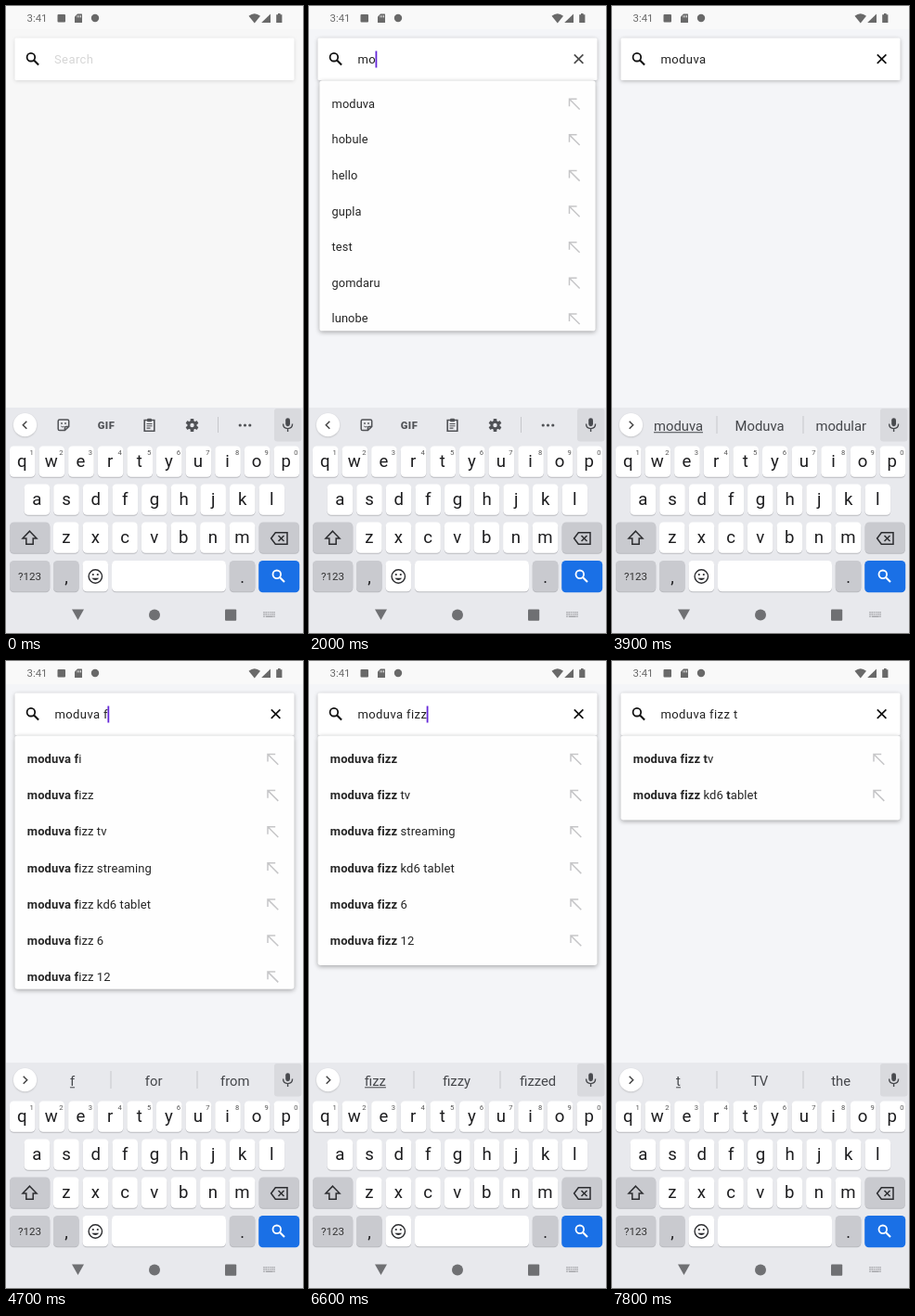
An HTML page with a canvas for the animation above (8000 ms loop, 320x676 px).

```html
<!DOCTYPE html>
<html lang="en">
<head>
<meta charset="utf-8">
<title>Search suggestions</title>
<style>
html, body { margin: 0; width: 100%; height: 100%; overflow: hidden; background: #f4f5f8; }
canvas { display: block; width: 320px; height: 676px; }
</style>
</head>
<body>
<canvas id="stage"></canvas>
<script>
const W = 320, H = 676, LOOP = 8000;
const canvas = document.getElementById('stage');
const ratio = window.devicePixelRatio || 1;
canvas.width = W * ratio;
canvas.height = H * ratio;
const c = canvas.getContext('2d');
const FONT = 'Roboto, sans-serif';

// [time, typed text, start of the cursor's blink]
const TYPING = [
  [0, '', 500], [1300, 'm', 1300], [1800, 'mo', 1800], [2600, 'mod', 2600],
  [3100, 'modu', 3100], [3250, 'moduv', 3250], [3400, 'moduva', 3400],
  [4200, 'moduva ', 4200], [4600, 'moduva f', 4600], [5100, 'moduva fi', 5000],
  [6200, 'moduva fiz', 6200], [6500, 'moduva fizz', 6500],
  [6800, 'moduva fizz ', 6800], [7300, 'moduva fizz t', 7300]
];

// [time, three suggested words]; none shows the toolbar
const STRIP = [
  [0, ''], [2300, 'mo,mom,more'], [2600, 'mod,moduva,Moduva'],
  [3100, 'modu,moduva,Moduva'], [3400, 'moduva,Moduva,modular'],
  [4300, 'with,and,is'], [4700, 'f,for,from'], [5200, 'fi,first,fine'],
  [5900, 'fi,first,#medal'], [6300, 'fiz,fizz,fixing'], [6600, 'fizz,fizzy,fizzed'],
  [7000, ''], [7500, 't,TV,the']
];

const brand = words => words.split(',').map(w => w ? 'moduva ' + w : 'moduva');
const popular = ['moduva', 'hobule', 'hello', 'gupla', 'test', 'gomdaru', 'lunobe'];
const starters = [...brand(',fizz,horn'), 'modular', ...brand('fizz tv,horn cup,fi')];
const related = brand('fizz,horn,fizz tv,horn cup,fi,fizz streaming,fizz kd6 tablet');
const fizz = brand('fizz,fizz tv,fizz streaming,fizz kd6 tablet,fizz 6,fizz 12');
const LISTS = [
  [0, []], [1850, popular], [2200, starters],
  [3250, [...starters.filter(s => s !== 'modular'), 'moduva fizz 6']],
  [4200, related], [4600, ['moduva fi', ...fizz]], [6200, fizz],
  [7300, brand('fizz tv,fizz kd6 tablet')]
];
const POPUP = [[1850, 3500], [4150, LOOP + 999]];

const at = (rows, t) => rows.filter(r => r[0] <= t).pop();
const clamp = v => Math.max(0, Math.min(1, v));

function text(s, x, y, size, color, align = 'left', weight = 400, gap = 0) {
  c.font = `${weight} ${size}px ${FONT}`;
  c.letterSpacing = gap + 'px';
  c.textAlign = align;
  c.fillStyle = color;
  c.fillText(s, x, y);
  return c.measureText(s).width;
}
function box(x, y, w, h, r, fill) {
  c.beginPath();
  c.roundRect(x, y, w, h, r);
  c.fillStyle = fill;
  c.fill();
}
function disc(x, y, r, fill) {
  c.beginPath();
  c.arc(x, y, r, 0, 7);
  c.fillStyle = fill;
  c.fill();
}
function path(d, color, width) {
  const p = new Path2D(d);
  if (width) {
    c.strokeStyle = color;
    c.lineWidth = width;
    c.stroke(p);
  } else {
    c.fillStyle = color;
    c.fill(p);
  }
}
function shadow(blur, dy, color) {
  c.shadowBlur = blur * ratio;
  c.shadowOffsetY = dy * ratio;
  c.shadowColor = color;
}
const noShadow = () => shadow(0, 0, 'transparent');

function magnifier(x, y, color) {
  c.beginPath();
  c.arc(x - 1.8, y - 1.8, 4.3, 0, 7);
  c.strokeStyle = color;
  c.lineWidth = 1.8;
  c.stroke();
  path(`M${x + 1.4} ${y + 1.4}L${x + 6.4} ${y + 6.4}`, color, 2.1);
}

function statusBar() {
  const g = '#696969';
  box(0, 0, W, 25, 0, '#f9f9f9');
  text('3:41', 22.5, 17, 11.4, g);
  box(55.5, 9, 8.5, 8.5, 1, g);
  path('M77 8.5H81.5Q82 8.5 82 9V17.5Q82 18 81.5 18H74.5Q74 18 74 17.5V11.5Z', g);
  path('M77 10.2V12.4M78.8 10.2V12.4M80.5 10.2V12.4', '#f9f9f9', .8);
  disc(96, 13, 4.2, g);
  path('M261.5 10.8Q267.8 5.8 274 10.8L267.8 18.4Z', g);
  path('M285 8.5V18H275.2Z', g);
  path('M293 8H295.6V9.2H297.4V18H291.2V9.2H293Z', g);
}

function searchCard(t) {
  const [, typed, base] = at(TYPING, t);
  shadow(4, 1, t < 100 ? 'rgba(0,0,0,.13)' : 'rgba(0,0,0,.27)');
  box(9.5, 34.5, 301, 45.5, 1.5, '#fff');
  noShadow();
  magnifier(28.7, 57, '#111');
  let end = 52.5;
  if (typed) end += text(typed, 52.5, 62.3, 13, '#222', 'left', 400, .4);
  else text('Search', 52, 62.3, 13, t < 100 ? '#d6d6d6' : '#c2c2c2', 'left', 400, .4);
  if (t >= base && Math.floor((t - base) / 500) % 2 === 0) box(end - .6, 48.5, 1.8, 18, 0, '#6426d9');
  c.globalAlpha = clamp((t - 1700) / 400);
  path('M285.8 52.3L295.4 61.9M295.4 52.3L285.8 61.9', '#111', 1.7);
  c.globalAlpha = 1;
}

// Splits an item into runs, with the start of each matching word in bold
function boldRuns(item, query) {
  const runs = [];
  const wanted = query.trim().split(' ');
  item.split(' ').forEach((word, i) => {
    const lead = i ? ' ' : '';
    if (wanted[0] && word.startsWith(wanted[0])) {
      const n = wanted.shift().length;
      runs.push([lead + word.slice(0, n), 700], [word.slice(n), 400]);
    } else runs.push([lead + word, 400]);
  });
  return runs;
}

function dropdown(t) {
  const span = POPUP.find(([from, to]) => t >= from && t < to + 150);
  if (!span) return;
  const items = at(LISTS, t)[1];
  const p = clamp((t - span[0]) / 250);
  const scale = .92 + .08 * (1 - (1 - p) ** 2);
  const query = items === popular ? '' : at(TYPING, t)[1];
  const h = Math.min(273.5, 13 + 39.1 * items.length);
  c.save();
  c.globalAlpha = Math.min(clamp(p * 2), 1 - clamp((t - span[1]) / 150));
  c.translate(160, 80.5);
  c.scale(scale, scale);
  c.translate(-160, -80.5);
  shadow(5, 1.5, 'rgba(0,0,0,.33)');
  box(9.5, 80.3, 301, h, 3, '#fefefe');
  noShadow();
  c.clip();
  items.forEach((item, i) => {
    const y = 110.2 + 39.1 * i;
    let x = 22.8;
    for (const [run, weight] of boldRuns(item, query)) {
      if (run) x += text(run, x, y, 13, '#252525', 'left', weight, .1);
    }
    path(`M293.3 ${y + 1.6}L282 ${y - 9.7}M282 ${y - 1.6}V${y - 9.7}H290.2`, '#c6c6c8', 1.5);
  });
  c.restore();
}

function toolbar() {
  const g = '#505256';
  path('M67.7 453.5V447.6Q67.7 446 66.1 446H57.8Q56.2 446 56.2 447.6V456Q56.2 457.6 57.8 457.6H63.4ZM63.4 457.6V454.8Q63.4 453.5 64.7 453.5H67.7', g, 1.5);
  disc(60, 450, .9, g);
  disc(64, 450, .9, g);
  path('M59.2 453Q61 454.8 62.6 453.4', g, 1);
  text('GIF', 108, 455.6, 11.2, g, 'center', 900, .4);
  path('M149.2 446.5H159.8V458.2H149.2Z', g, 1.6);
  box(152, 444.8, 5, 3.4, 1, g);
  path('M151.5 450.5H157.5M151.5 452.8H157.5M151.5 455.1H155.5', g, 1.1);
  for (let i = 0; i < 6; i++) {
    c.save();
    c.translate(200.5, 452);
    c.rotate(i * Math.PI / 3);
    box(-1.8, -7, 3.6, 4, .6, g);
    c.restore();
  }
  disc(200.5, 452, 5.1, g);
  disc(200.5, 452, 2.2, '#e8e9ed');
  box(228, 443, 1, 17, 0, '#c6c7cb');
  [252.2, 257.5, 262.8].forEach(x => disc(x, 452, 1.6, g));
}

function medal(x) {
  path(`M${x - 6.5} 444H${x + 6.5}L${x + 2} 452.5H${x - 2}Z`, '#2b8fd0');
  path(`M${x - 2} 444H${x + 2}L${x} 449Z`, '#e8e9ed');
  disc(x, 455.2, 5.6, '#e6a523');
  disc(x, 455.2, 4.4, '#fbcf4a');
  text('1', x, 458, 7.5, '#b9791a', 'center', 700);
}

function strip(t) {
  const words = at(STRIP, t)[1];
  box(289, 434, 29.5, 35.5, 3, '#d9dade');
  shadow(2, .6, 'rgba(0,0,0,.2)');
  disc(20.5, 451.7, 12.6, '#fff');
  noShadow();
  path(words ? 'M18.7 447.7L22.7 451.7L18.7 455.7' : 'M22.3 447.7L18.3 451.7L22.3 455.7', '#444', 1.5);
  box(301.2, 444.2, 4.8, 9, 2.4, '#484a4e');
  path('M298.6 450.6Q298.6 455.6 303.6 455.6Q308.6 455.6 308.6 450.6M303.6 455.6V459', '#484a4e', 1.4);
  if (!words) return toolbar();
  words.split(',').forEach((word, i) => {
    const x = 71.5 + 87.6 * i;
    if (word === '#medal') return medal(x + 1);
    const w = text(word, x, 457.5, 14.8, '#45474b', 'center');
    if (!i) box(x - w / 2, 459.3, w, 1, 0, '#45474b');
  });
  box(112.5, 442, 1, 19, 0, '#c6c7cb');
  box(205.5, 442, 1, 19, 0, '#c6c7cb');
}

function key(x, y, w, fill) {
  box(x, y + 1, w, 33.3, 4.5, '#b9babf');
  box(x, y, w, 33.3, 4.5, fill);
}
function letters(row, x, y, hints) {
  [...row].forEach((ch, i) => {
    const mid = x + 31.62 * i;
    key(mid - 13.8, y, 27.6, '#fff');
    text(ch, mid - (hints ? .5 : 0), y + 22.4, 18.6, '#1d1d1f', 'center');
    if (hints) text((i + 1) % 10, mid + 10, y + 9, 7.6, '#555', 'center');
  });
}

function keyboard() {
  const grey = '#c9cacf', ink = '#2c2d30';
  letters('qwertyuiop', 17.7, 474.5, true);
  letters('asdfghjkl', 33.4, 515.5);
  letters('zxcvbnm', 64.8, 556.5);
  key(4, 556.5, 43.3, grey);
  key(272.6, 556.5, 43.3, grey);
  path('M25.5 566.2L33 574H29.2V580.3H21.8V574H18Z', ink, 1.5);
  path('M285.6 574L290.3 567.8H303V580.2H290.3Z', ink, 1.5);
  path('M293.5 571L299.5 577M299.5 571L293.5 577', ink, 1.5);

  const y = 598;
  key(4, y, 43.3, grey);
  text('?123', 25.6, 619.4, 11.6, '#333', 'center');
  key(51, y, 27.6, grey);
  text(',', 65, 621.8, 18, '#1d1d1f', 'center');
  key(82.5, y, 27.6, '#fff');
  c.beginPath();
  c.arc(96.3, 615, 7.2, 0, 7);
  c.strokeStyle = ink;
  c.lineWidth = 1.4;
  c.stroke();
  disc(93.8, 613, 1.1, ink);
  disc(98.8, 613, 1.1, ink);
  path('M92.3 616.8Q96.3 621.4 100.3 616.8Z', ink);
  key(114, y, 123, '#fff');
  key(240.8, y, 27.6, grey);
  text('.', 254.6, 621.8, 18, '#1d1d1f', 'center');
  box(272.2, y, 44, 34.3, 4.5, '#1a70e6');
  magnifier(293.6, 614.6, '#fff');
}

function navBar() {
  const g = '#6f7073';
  path('M71 650.5H84L77.5 662Z', g);
  disc(160, 656.6, 6, g);
  box(236, 650.5, 12.2, 12.2, 1, g);
  for (let row = 0; row < 3; row++) {
    for (let i = 0; i < 6; i++) {
      if (row < 2 || i === 0 || i === 5) box(277.3 + 2.2 * i, 653 + 2.3 * row, 1.4, 1.4, 0, '#a2a3a7');
    }
  }
  box(279.7, 657.6, 8, 1.4, 0, '#a2a3a7');
}

function draw(t) {
  c.setTransform(ratio, 0, 0, ratio, 0, 0);
  box(0, 0, W, H, 0, t < 100 ? '#f7f7f7' : '#f4f5f8');
  statusBar();
  searchCard(t);
  dropdown(t);
  box(0, 433, W, H - 433, 0, '#e8e9ed');
  strip(t);
  keyboard();
  navBar();
}

const start = performance.now();
function tick() {
  draw((performance.now() - start) % LOOP);
  requestAnimationFrame(tick);
}
tick();
</script>
</body>
</html>
```
